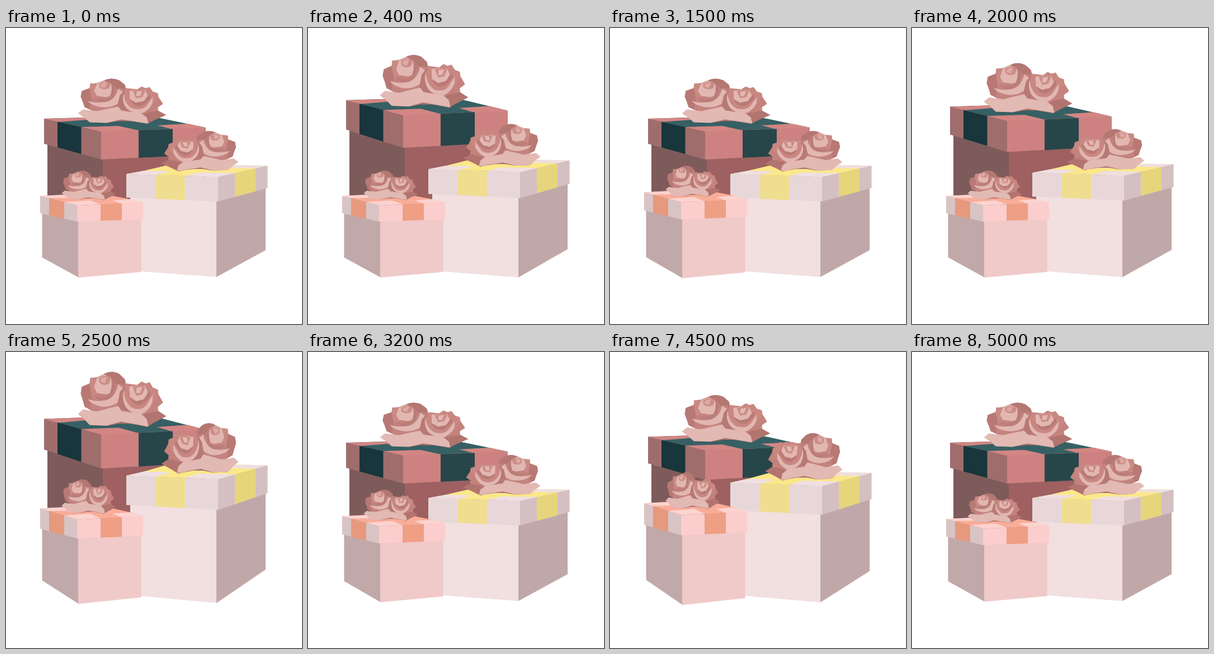
Animation, 529 px wide and 529 px high, one loop 5.11 s. Source, as an HTML page:

```html
<!DOCTYPE html>
<html lang="en">
<head>
<meta charset="utf-8">
<title>Gift boxes</title>
<style>
  html, body { margin: 0; width: 100%; height: 100%; overflow: hidden; background: #fff; }
  svg { display: block; width: 100vw; height: 100vh; }
</style>
</head>
<body>
<svg viewBox="0 0 529 529">
  <defs>
    <g id="roses">
      <!-- left bloom -->
      <path fill="#c4837e" d="M4 32L6 22L20 17L21 9L33 8L46 3Q59-3 73 3L83 11L86 20L90 58L30 60L11 51L8 42Z"/>
      <path fill="#b47772" d="M46 3Q59-3 73 3L83 11L84 19L74 17L68 18Q60 7 46 3Z"/>
      <path fill="#b87975" d="M4 32L6 22L20 17L24 34L20 55L11 51L8 42Z"/>
      <path fill="#c98a84" d="M20 17L21 9L33 8L29 21L32 33L24 36Z"/>
      <path fill="#e2b7b1" d="M33 9L46 4L57 8L66 17L61 30L49 33L33 31L28 22Z"/>
      <path fill="#cb8d86" d="M37 9Q48 3 58 8L55 17Q44 22 37 15Z"/>
      <path fill="#dcaaa3" d="M41 9L51 7L47 17L39 14Z"/>
      <path fill="#b97b76" d="M58 8L66 17L62 30L55 33Q62 22 58 8Z"/>
      <path fill="#e2b7b1" d="M17 40Q38 46 56 39Q68 32 71 18L80 24Q76 36 70 45Q54 54 36 50Q22 47 17 40Z"/>
      <path fill="#bb7d78" d="M26 35Q45 39 60 32L66 29Q60 40 47 42Q34 42 26 35Z"/>
      <!-- right bloom -->
      <path fill="#c98781" d="M74 30L86 17L105 19L113 14L120 17L127 15L133 23L142 26L143 33L151 45L142 51L143 62L122 76L88 68L68 58Z"/>
      <path fill="#b77974" d="M84 19L80 34L84 50L98 62L80 62L68 55L74 30Z"/>
      <path fill="#e2b7b1" d="M91 22L105 20L119 21L124 30L117 41L103 44L92 37Z"/>
      <path fill="#cb8b85" d="M97 22L113 19L119 23L114 33L103 35Z"/>
      <path fill="#e2b7b1" d="M104 23L114 22L110 31L103 31Z"/>
      <path fill="#b97a75" d="M92 37L103 43L117 40L127 28L129 34Q118 49 106 49Q96 47 92 37Z"/>
      <path fill="#e2b7b1" d="M81 26Q82 45 96 53Q114 58 122 48L133 33L132 44Q126 58 112 62Q91 62 83 49Q77 38 81 26Z"/>
      <path fill="#c4827c" d="M143 33L151 45L142 51L128 66L114 62Q130 54 143 33Z"/>
      <!-- leaves -->
      <path fill="#b2746f" d="M118 62L142 57L157 65L136 74L122 81L105 76Z"/>
      <path fill="#ad716c" d="M20 78L50 72L75 71L98 75L120 80L92 76L72 76L52 79Z"/>
      <path fill="#e2b9b3" d="M-1 62L8 55L24 57L34 58L56 53L71 50L77 57L91 59L112 62L122 69L125 80L116 79L98 76L76 73L50 79L20 78L11 70Z"/>
    </g>
  </defs>

  <g class="part" data-delay="0" data-base="357">
    <path fill="#7e5b5b" d="M74 200L174 228V362L74 340Z"/>
    <path fill="#9e6061" d="M173 228L357 220V350L173 362Z"/>
    <path fill="#366064" d="M68 162L140 160L255 157L285 163L357 178L170 186Z"/>
    <path fill="#d38683" d="M68 162L140 160L160 163L92 168ZM134.5 177L201 175L237 183L170 186ZM270 174L325 171L357 178L298 181Z"/>
    <path fill="#a06d6d" d="M68 162L170 185V235L68 207Z"/>
    <path fill="#18363b" d="M92 167.4L134.5 177V225.3L92 213.6Z"/>
    <path fill="#cd8180" d="M170 185L357 178V226L170 235Z"/>
    <path fill="#27464a" d="M237 182.6L298 180.2V229L237 232Z"/>
  </g>
  <g class="part" data-delay="0" data-base="342"><use href="#roses" transform="translate(129.5 90.5)"/></g>

  <g class="part" data-delay="2" data-base="430">
    <path fill="#f2dfe0" d="M222 295H377V445L242 435L222 434Z"/>
    <path fill="#c1a8a8" d="M376 295L464 275V397L376 445Z"/>
  </g>
  <g class="part" data-delay="2" data-base="423">
    <path fill="#fbe889" d="M215 261L247 255L285 246L413 245L467.5 246L379 266Z"/>
    <path fill="#efdfe1" d="M215 261L247 255L296 256L268 263ZM320 264L345 258L409 259L379 266ZM395 250L413 245L467.5 246L446 251Z"/>
    <path fill="#e8d7d9" d="M215 261L379 266V310L215 303Z"/>
    <path fill="#efde90" d="M268 262.6L320 264.2V307.4L268 305.2Z"/>
    <path fill="#d4c0c2" d="M379 266L467.5 246V286L379 310Z"/>
    <path fill="#e7d57c" d="M409 259.2L446 250.8V291.7L409 301.8Z"/>
  </g>
  <g class="part" data-delay="2" data-base="414"><use href="#roses" transform="matrix(-.872 0 0 .895 414.5 184)"/></g>

  <g class="part" data-delay="4" data-base="421">
    <path fill="#c1a9a9" d="M64.5 325L130 340V446L64.5 410Z"/>
    <path fill="#f0c9c9" d="M129 340L241.5 335V436L129 446Z"/>
    <path fill="#f9ad98" d="M61 300L105 298L185 299L222 306L245 312L127 317Z"/>
    <path fill="#fcd3cf" d="M61 300L105 298L125 303L77 304ZM104 311L150 308L169 315L127 317ZM190 308L222 306L245 312L207 314Z"/>
    <path fill="#d9c4c5" d="M61 300L127 317V346L61 331Z"/>
    <path fill="#e7997e" d="M77 304L104 311V341L77 335Z"/>
    <path fill="#fbcdcc" d="M127 317L245 312V342L127 346Z"/>
    <path fill="#ee9f84" d="M169 315.2L207 313.6V343.3L169 344.6Z"/>
  </g>
  <g class="part" data-delay="4" data-base="416"><use href="#roses" transform="matrix(.615 0 0 .65 100 255)"/></g>
</svg>
<script>
  const LOOP = 5110, STEP = 100, LAST = 50;
  const CYCLE = 17, RISE = 13, STRETCH = 0.25;
  const parts = [...document.querySelectorAll('.part')].map(el => ({
    el, delay: +el.dataset.delay, base: +el.dataset.base
  }));

  // One smooth stretch and return, then a rest until the next cycle.
  function lift(step, delay) {
    const u = ((step - delay + CYCLE) % CYCLE) / RISE;
    return u < 1 ? Math.sin(Math.PI * u) ** 2 : 0;
  }

  function draw(time) {
    const step = Math.min(LAST, Math.floor((time % LOOP) / STEP)) % CYCLE;
    for (const { el, delay, base } of parts) {
      const s = 1 + STRETCH * lift(step, delay);
      el.setAttribute('transform', `matrix(1 0 0 ${s} 0 ${base * (1 - s)})`);
    }
  }

  const start = performance.now();
  function tick() {
    draw(performance.now() - start);
    requestAnimationFrame(tick);
  }
  tick();
</script>
</body>
</html>
```
